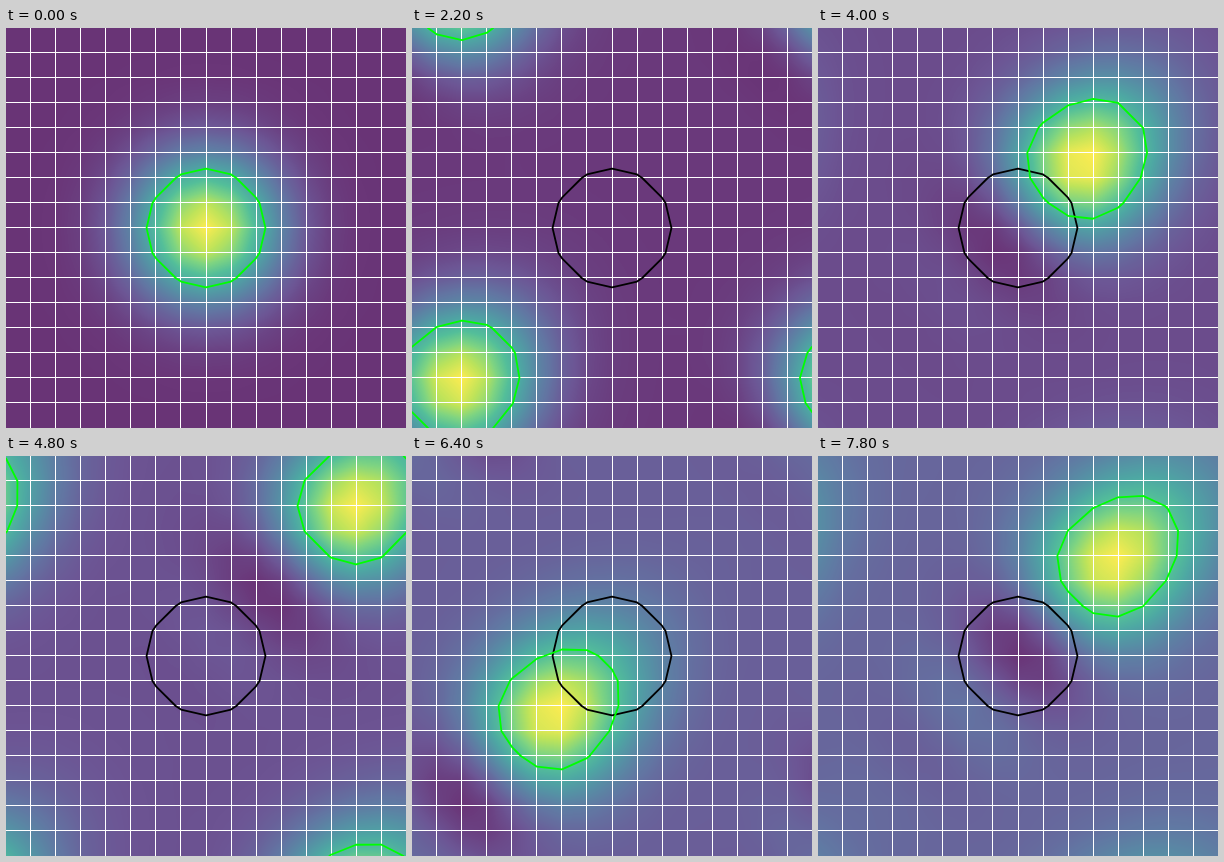
An HTML page with a canvas that plays this animation: 400 by 400 pixels, repeating every 8000 ms.

```html
<!DOCTYPE html>
<html lang="en">
<head>
<meta charset="utf-8">
<title>Advection on a periodic grid</title>
<style>
  html, body { margin: 0; width: 100%; height: 100%; overflow: hidden; background: #fff; }
  canvas { display: block; width: 400px; height: 400px; }
</style>
</head>
<body>
<canvas id="stage" width="400" height="400"></canvas>
<script>
const SIZE = 400, CELLS = 16, CELL = SIZE / CELLS;
const SIGMA = 2;                          // width of the bump, in cells
const SHIFT = 0.05 * CELLS / Math.SQRT2;  // travel per solver step along each axis, in cells
const LEVEL = 0.5;
const FRAME_MS = 200, FRAMES = 40;
const STEPS_IN_CYCLE = [0, 2, 4, 5, 6, 8];

const ctx = document.getElementById('stage').getContext('2d');
const image = ctx.createImageData(SIZE, SIZE);

// Viridis at 80 % opacity over white
const STOPS = ['440154', '472d7b', '3b528b', '2c728e', '21918c', '28ae80', '5ec962', 'addc30', 'fde725']
  .map(hex => [0, 2, 4].map(i => parseInt(hex.slice(i, i + 2), 16)));
const PALETTE = Array.from({ length: 256 }, (_, i) => {
  const p = i / 255 * (STOPS.length - 1);
  const k = Math.min(Math.floor(p), STOPS.length - 2);
  return STOPS[k].map((c, j) => 51 + 0.8 * (c + (STOPS[k + 1][j] - c) * (p - k)));
});

// Fourier modes of a Gaussian; Crank-Nicolson stepping delays the short waves
const modes = [];
for (let m = -7; m <= 7; m++) {
  for (let n = -7; n <= 7; n++) {
    const kx = 2 * Math.PI * m / CELLS, ky = 2 * Math.PI * n / CELLS;
    modes.push({
      kx, ky,
      amp: 2 * Math.PI * (SIGMA / CELLS) ** 2 * Math.exp(-(SIGMA ** 2) * (kx * kx + ky * ky) / 2),
      turn: 2 * Math.atan(SHIFT * (kx - ky) / 2)
    });
  }
}

function solve(steps) {
  return Array.from({ length: CELLS * CELLS }, (_, i) => {
    const x = i % CELLS - CELLS / 2, y = Math.floor(i / CELLS) - CELLS / 2;
    return modes.reduce((sum, m) => sum + m.amp * Math.cos(m.kx * x + m.ky * y - steps * m.turn), 0);
  });
}

const node = (field, i, j) => field[(j % CELLS) * CELLS + i % CELLS];

function paintField(field) {
  const low = Math.min(...field), range = Math.max(...field) - low;
  for (let y = 0, p = 0; y < SIZE; y++) {
    const j = Math.floor(y / CELL), v = (y + 0.5) / CELL - j;
    for (let x = 0; x < SIZE; x++, p += 4) {
      const i = Math.floor(x / CELL), u = (x + 0.5) / CELL - i;
      const top = node(field, i, j) * (1 - u) + node(field, i + 1, j) * u;
      const bottom = node(field, i, j + 1) * (1 - u) + node(field, i + 1, j + 1) * u;
      const value = (top * (1 - v) + bottom * v - low) / range;
      image.data.set(PALETTE[Math.round(value * 255)], p);
      image.data[p + 3] = 255;
    }
  }
  ctx.putImageData(image, 0, 0);
}

function drawGrid() {
  ctx.fillStyle = '#fff';
  for (let k = 1; k < CELLS; k++) {
    ctx.fillRect(k * CELL - (k < CELLS / 2 ? 1 : 0), 0, 1, SIZE);
    ctx.fillRect(0, k * CELL - 1, SIZE, 1);
  }
}

function drawContour(field, color) {
  const corners = [[0, 0], [1, 0], [1, 1], [0, 1]];
  ctx.beginPath();
  for (let j = 0; j < CELLS; j++) {
    for (let i = 0; i < CELLS; i++) {
      const hits = [];
      corners.forEach(([ax, ay], c) => {
        const [bx, by] = corners[(c + 1) % 4];
        const a = node(field, i + ax, j + ay) - LEVEL;
        const b = node(field, i + bx, j + by) - LEVEL;
        if (a < 0 === b < 0) return;
        const t = a / (a - b);
        hits.push([(i + ax + (bx - ax) * t) * CELL, (j + ay + (by - ay) * t) * CELL]);
      });
      for (let h = 0; h + 1 < hits.length; h += 2) {
        ctx.moveTo(...hits[h]);
        ctx.lineTo(...hits[h + 1]);
      }
    }
  }
  ctx.strokeStyle = color;
  ctx.lineWidth = 1.8;
  ctx.lineCap = 'round';
  ctx.stroke();
}

const start = solve(0);
let shown = -1;

function tick() {
  const frame = Math.floor(performance.now() / FRAME_MS) % FRAMES;
  if (frame !== shown) {
    shown = frame;
    const field = solve(10 * Math.floor(frame / 6) + STEPS_IN_CYCLE[frame % 6]);
    paintField(field);
    drawGrid();
    if (frame > 0) drawContour(start, '#000');
    drawContour(field, '#0f0');
  }
  requestAnimationFrame(tick);
}
tick();
</script>
</body>
</html>
```
